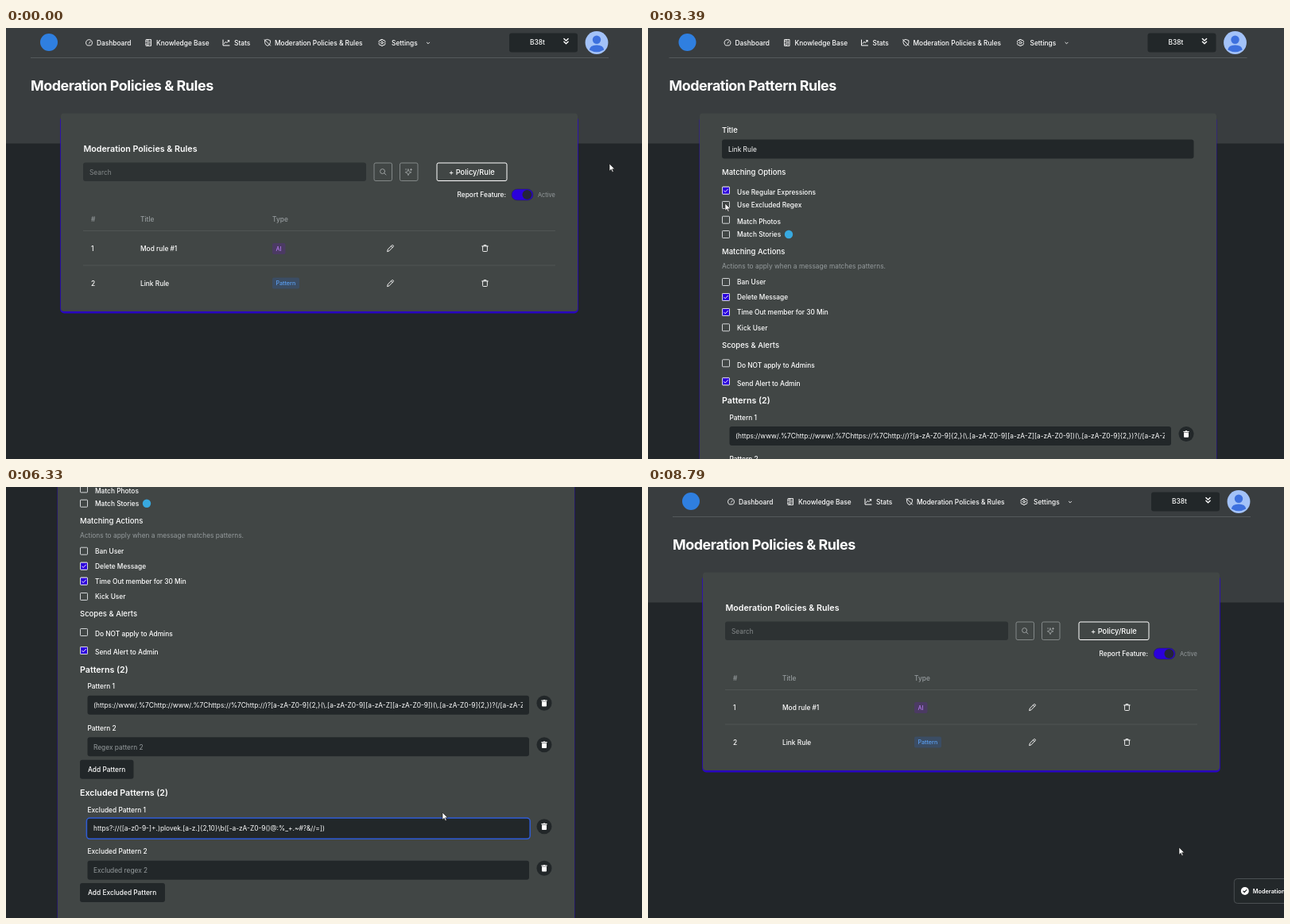
Animation of 800 by 543 pixels, one loop 8.82 s. Source, as an HTML page:

```html
<!DOCTYPE html>
<html lang="en">
<head>
<meta charset="utf-8">
<title>Moderation rules</title>
<style>
html, body { margin: 0; width: 100%; height: 100%; overflow: hidden; background: #222629; }
svg { display: block; }
text { font-family: Inter, "Liberation Sans", sans-serif; white-space: pre; }
.line { fill: none; stroke: #fff; stroke-width: 1; stroke-linecap: round; stroke-linejoin: round; }
</style>
</head>
<body>
<svg id="stage" width="100%" height="100%" viewBox="0 0 800 543"></svg>
<script>
const LOOP = 8820;
const ACCENT = '#2b00dc', DARK = '#222729', PANEL = '#414645', GREY = '#959b9d';
const SM = 8.35, BASE = 9.5, LG = 10.7;

const esc = s => s.replace(/&/g, '&amp;').replace(/</g, '&lt;');

// y is the vertical middle of the capitals
function text(x, y, str, { size = SM, weight = 500, fill = '#fff', more = '' } = {}) {
  return `<text x="${x}" y="${(y + size * 0.36).toFixed(2)}" font-size="${size}" font-weight="${weight}" fill="${fill}" ${more}>${esc(str)}</text>`;
}
function box(x, y, w, h, fill, r = 3, more = '') {
  return `<rect x="${x}" y="${y}" width="${w}" height="${h}" rx="${r}" fill="${fill}" ${more}/>`;
}
function disc(x, y, r, fill, more = '') {
  return `<circle cx="${x}" cy="${y}" r="${r}" fill="${fill}" ${more}/>`;
}
function icon(x, y, d, more = '') {
  return `<path class="line" transform="translate(${x} ${y})" d="${d}" ${more}/>`;
}
function group(id, body, more = '') {
  return `<g id="${id}" ${more}>${body}</g>`;
}
function panel(x, y, w, h, id, side) {
  return box(x - side, y + 4, w + 2 * side, h - 1.5, ACCENT, 5, `id="${id}Edge" opacity=".85"`) +
    box(x, y, w, h, PANEL, 4, `id="${id}"`);
}

function header(title) {
  const nav = [[114, 'Dashboard'], [189, 'Knowledge Base'], [287, 'Stats'],
    [338, 'Moderation Policies & Rules'], [485, 'Settings']];
  const thin = 'style="stroke-width:.9"';
  return disc(54, 18, 11, '#2f7fe0') +
    nav.map(([x, s]) => text(x, 18.5, s)).join('') +
    icon(104.5, 18.5, 'M-2.6 3.2A4 4 0 1 1 2.6 3.2ZM0 .8L1.6 -1.4', thin) +
    icon(179.5, 18.5, 'M-3 -4H3V4H-3ZM-1 -4V4M.6 -1.8H1.6M.6 0H1.6M.6 1.8H1.6M-3.6 -2H-2.6M-3.6 2H-2.6', thin) +
    icon(277, 18.5, 'M-4 -3.5V3.5H4M-2.4 1L-.6 -1.2L.8 .2L3.6 -2.8M2 -2.8H3.6V-1.2') +
    icon(329, 18.5, 'M0 -4L3.4 -2.8V0Q3.2 2.6 0 4Q-3.2 2.6 -3.4 0V-2.8ZM-3.8 -3.8L3.6 3.6', thin) +
    icon(473, 18.5, 'M1.4 0A1.4 1.4 0 1 1 -1.4 0A1.4 1.4 0 1 1 1.4 0M-1 -4H1L1.4 -2.8L3 -3.1L4.1 -1.3L3.3 0L4.1 1.3L3 3.1L1.4 2.8L1 4H-1L-1.4 2.8L-3 3.1L-4.1 1.3L-3.3 0L-4.1 -1.3L-3 -3.1L-1.4 -2.8Z', thin) +
    icon(531, 19, 'M-1.6 -.8L0 .8L1.6 -.8', thin) +
    box(633, 6.5, 86, 24, DARK) + text(659, 18, 'B38t') +
    icon(704.5, 16.5, 'M-2.6 -3L0 -.6L2.6 -3M-2.6 .8L0 3.2L2.6 .8', 'style="stroke-width:1.4"') +
    disc(743, 18.5, 14.4, '#a3c2f8') + disc(743, 14.8, 5.2, '#3d70de') +
    '<path d="M733.8 27.6Q734.5 21.6 743 21.6Q751.5 21.6 752.2 27.6Q743 33 733.8 27.6Z" fill="#3d70de"/>' +
    box(31, 37, 727, 1, '#54595b', 0) +
    text(31, 72.5, title, { size: 17.9, weight: 700, more: 'letter-spacing="-.025em"' });
}
const band = box(0, -20, 800, 165.5, '#393d3f', 0);

function listPage() {
  const grey = { fill: GREY }, edge = 'stroke="#8b9090" stroke-width=".9"';
  const row = (y, n, name) => text(107, y, n) + text(169, y, name) +
    icon(483.5, y, 'M-3.8 3.8L-3.1 1.2L2 -3.7Q3 -4.3 3.7 -3.5Q4.3 -2.8 3.6 -2L-1.3 3.1ZM1 -2.7L2.7 -1', 'style="stroke-width:.9"') +
    icon(602.5, y, 'M-3.8 -2.6H3.8M-1.4 -2.8V-4H1.4V-2.8M-2.9 -2.4V3.2Q-2.9 4 -2.1 4H2.1Q2.9 4 2.9 3.2V-2.4', 'style="stroke-width:.9"');
  return band + header('Moderation Policies & Rules') + panel(69, 107.5, 650, 249.5, 'listPanel', 0.8) +
    text(97.5, 152.5, 'Moderation Policies & Rules', { size: LG, weight: 600 }) +
    box(97, 169.5, 356, 23.5, '#2d3233') + text(105, 182, 'Search', { fill: '#858a8b', weight: 400 }) +
    box(463, 170, 22.5, 22.5, 'none', 2, edge) + box(495.5, 170, 22.5, 22.5, 'none', 2, edge) +
    icon(474, 181, 'M2.6 -.4A3 3 0 1 1 -3.4 -.4A3 3 0 1 1 2.6 -.4M1.8 1.8L4 4', 'style="stroke:#a4a9a9;stroke-width:.9"') +
    icon(506.5, 181.5, 'M-.5 -3.6L.6 -.8L3.4 .3L.6 1.4L-.5 4.2L-1.6 1.4L-4.2 .3L-1.6 -.8ZM3 -4.2V-2M1.9 -3.1H4.1M-3.4 -4V-2.6', 'style="stroke:#a4a9a9;stroke-width:.8"') +
    box(542, 170, 88, 22.5, 'none', 2, 'stroke="#fff"') + text(557, 181.5, '+ Policy/Rule', { size: 9.3 }) +
    text(567.5, 210, 'Report Feature:') +
    box(636, 203, 27, 14, ACCENT, 7, 'stroke="#25204f" stroke-width=".6"') + disc(655.5, 210, 6, '#25243a') +
    text(669, 210, 'Active', { size: 7.4, weight: 400, fill: GREY }) +
    text(107, 241, '#', grey) + text(169, 241, 'Title', grey) + text(335, 241, 'Type', grey) +
    box(97, 255, 594, 1, '#505554', 0) + box(97, 298.5, 594, 1, '#505554', 0) +
    row(277.5, '1', 'Mod rule #1') + row(321.5, '2', 'Link Rule') +
    box(335, 271, 16.5, 14, '#4b3a63', 2) + text(339.5, 278, 'AI', { size: 7.15, fill: '#b57bf0' }) +
    box(335, 314.5, 34, 14, '#3b4d64', 2) + text(339.5, 321.5, 'Pattern', { size: 7.15, fill: '#5b9ff2' });
}

function check(y, labelY, label, on, id) {
  const square = fill => box(93.5, y - 4.5, 9, 9, fill, 0.8, 'stroke="#e4e6e8" stroke-width=".9"');
  const mark = square(ACCENT) + icon(98, y, 'M-2.4 .2L-.8 1.8L2.5 -1.7', 'style="stroke-width:.9"');
  return square('none') + (on || id ? group(id || '', mark) : '') + text(112, labelY, label);
}
function bin(y, id = '') {
  return group(id, disc(677, y, 9.5, DARK) +
    `<path transform="translate(677 ${y})" fill="#fff" d="M-3.6 -3.6H-1.4L-.9 -4.2H.9L1.4 -3.6H3.6V-2.5H-3.6ZM-3 -1.9H3V3.3Q3 4.2 2.1 4.2H-2.1Q-3 4.2 -3 3.3Z"/>`);
}
function field(label, y, hint, binId) {
  return text(102.5, y, label) + box(102.5, y + 11.5, 555.5, 24, DARK, 3) +
    (hint ? text(110, y + 24, hint, { fill: GREY, weight: 400, more: binId ? `id="${binId}Hint"` : '' }) : '') +
    bin(y + 21, binId);
}
const heading = (y, s, more = '') => text(93, y, s, { size: LG, weight: 600, more });
const sub = (y, s) => text(93, y, s, { size: BASE });
const button = (y, w, s) => box(93, y, w, 24, DARK, 3) + text(103, y + 12.2, s);

const LINKS = '(https://www/.%7Chttp://www/.%7Chttps://%7Chttp://)?[a-zA-Z0-9]{2,}(\\.[a-zA-Z0-9][a-zA-Z][a-zA-Z0-9])(\\.[a-zA-Z0-9]{2,})?(/[a-zA-Z0-9]';
const EXCLUDED = 'https?://([a-z0-9-]+.)plovek.[a-z.]{2,10}\\b([-a-zA-Z0-9()@:%_+.~#?&//=])';

function formPage() {
  return band + `<g transform="translate(-4.5 0)">${header('Moderation Pattern Rules')}</g>` +
    panel(65, 107.5, 650, 666.5, 'formPanel', 0.4) +
    sub(129, 'Title') + box(93, 140.5, 593.5, 24, DARK) + text(101, 153, 'Link Rule', { weight: 400 }) +
    sub(181.5, 'Matching Options') +
    check(204.7, 207, 'Use Regular Expressions', true) +
    check(223, 223.2, 'Use Excluded Regex', false, 'tick') +
    check(241.7, 244, 'Match Photos') + check(260, 260, 'Match Stories') + disc(177, 260, 5.2, '#38a9e0') +
    sub(282, 'Matching Actions') +
    text(93, 300, 'Actions to apply when a message matches patterns.', { fill: GREY, weight: 400 }) +
    check(320, 320, 'Ban User') + check(339, 339, 'Delete Message', true) +
    check(358, 358, 'Time Out member for 30 Min', true) + check(377.3, 377.5, 'Kick User') +
    sub(399.3, 'Scopes & Alerts') +
    check(422.3, 424.7, 'Do NOT apply to Admins') + check(445.3, 447.5, 'Send Alert to Admin', true) +
    heading(469.3, 'Patterns (2)') + field('Pattern 1', 490.5) +
    `<svg x="110" y="502" width="540" height="24">${text(0, 12.3, LINKS, { weight: 400 })}</svg>` +
    field('Pattern 2', 543, 'Regex pattern 2') + button(583, 67.5, 'Add Pattern') +
    heading(624.7, 'Excluded Patterns (1)', 'id="count"') +
    field('Excluded Pattern 1', 646, 'Excluded regex 1', 'bin1') +
    group('focus', box(101.4, 656.4, 557.8, 26.2, DARK, 4, 'stroke="#2f5cd6" stroke-width="1.5"')) +
    text(110, 669.8, EXCLUDED, { weight: 400, more: 'id="regex"' }) +
    '<rect id="caret" y="664.5" width="1" height="10" fill="#fff"/>' +
    group('second', field('Excluded Pattern 2', 698.5, 'Excluded regex 2')) +
    group('tail', button(685.5, 107, 'Add Excluded Pattern') + text(536, 746, 'Back') +
      box(580, 733.5, 107, 26.5, ACCENT, 3) + box(580, 733.5, 107, 26.5, 'url(#glow)', 3) +
      text(609, 747, 'Update Rule'));
}

const toast = box(655.5, 493.5, 140, 31, '#23282a', 4, 'stroke="#4b5053"') + disc(669, 509, 5, '#fff') +
  icon(669, 509, 'M-2 .1L-.6 1.5L2.1 -1.4', 'style="stroke:#23282a;stroke-width:1.2"') +
  text(679, 509.5, 'Moderation rule updated.', { size: 7.3, weight: 600 });

const stage = document.getElementById('stage');
stage.innerHTML = `<defs><radialGradient id="glow" gradientUnits="userSpaceOnUse" cx="0" cy="0" r="1" gradientTransform="translate(582 762) scale(62 27)">
  <stop offset="0" stop-color="#86ecff"/><stop offset=".3" stop-color="#6fc4fa"/><stop offset=".65" stop-color="#3f58ee" stop-opacity=".8"/><stop offset="1" stop-color="${ACCENT}" stop-opacity="0"/>
  </radialGradient></defs>` +
  group('list', listPage()) + group('form', formPage()) + group('toast', toast) +
  group('cursor', '<path d="M0 0V9.2L2.2 7.2L3.7 10.5L5.2 9.8L3.7 6.7H6.6Z" fill="#fff" stroke="#111" stroke-width=".6"/>');

const $ = id => document.getElementById(id);
const show = (id, on) => $(id).setAttribute('display', on ? 'inline' : 'none');
const move = (id, x, y) => $(id).setAttribute('transform', `translate(${x.toFixed(2)} ${y.toFixed(2)})`);
const smooth = p => p * p * (3 - 2 * p);
const linear = p => p;

// rows of [time, value, value...]
function at(keys, t, ease = smooth) {
  const i = keys.findIndex(k => k[0] > t);
  if (i === 0) return keys[0].slice(1);
  if (i < 0) return keys[keys.length - 1].slice(1);
  const a = keys[i - 1], b = keys[i], p = ease((t - a[0]) / (b[0] - a[0]));
  return a.slice(1).map((v, n) => v + (b[n + 1] - v) * p);
}

const POINTER = [[0, 759, 171], [400, 759, 171], [1500, 482, 322], [1850, 482, 322], [2300, 474, 323],
  [2650, 474, 323], [3300, 97, 221], [3550, 97, 221], [4030, 284, 240], [4250, 284, 240],
  [4550, 240, 358], [4900, 146, 457], [5100, 146, 457], [5500, 300, 428], [5800, 300, 428],
  [6330, 549, 410], [6480, 549, 410], [7030, 643, 475], [7400, 643, 475], [8000, 668, 454]];
const SCROLL = [[3750, 0], [4030, 93], [4450, 239.3], [6450, 239.3], [6850, 311.7]];
const TOAST = [[7240, 150], [7360, 0], [8600, 0], [8790, 81], [8820, 105]];
const OPEN = 1950, TICK = 3420, ADD = 5000, FOCUS = 5560, PASTE = 5800, SAVE = 7180, CLOSE = 8330;

function draw(now) {
  const t = now % LOOP;
  const onForm = t >= OPEN && t < CLOSE, added = t >= ADD, focused = t >= FOCUS && t < SAVE;
  show('list', !onForm);
  show('form', onForm);
  move('form', 0, -at(SCROLL, t, linear)[0]);
  show('tick', t >= TICK);
  show('second', added);
  move('tail', 0, added ? 52.7 : 0);
  const height = added ? 719.7 : 666.5;
  $('formPanel').setAttribute('height', height);
  $('formPanelEdge').setAttribute('height', height - 1.5);
  $('count').textContent = `Excluded Patterns (${added ? 2 : 1})`;
  $('bin1').setAttribute('opacity', added ? 1 : 0.5);
  show('focus', focused);
  show('regex', t >= PASTE);
  show('bin1Hint', t < PASTE);
  show('caret', focused && (t - FOCUS) % 1060 < 530);
  if (onForm) $('caret').setAttribute('x', 110.5 + (t >= PASTE ? $('regex').getComputedTextLength() : 0));
  show('toast', t >= TOAST[0][0]);
  move('toast', at(TOAST, t, linear)[0], 0);
  move('cursor', ...at(POINTER, t));
}

const start = performance.now();
function tick() {
  draw(performance.now() - start);
  requestAnimationFrame(tick);
}
draw(0);
requestAnimationFrame(tick);
</script>
</body>
</html>
```
